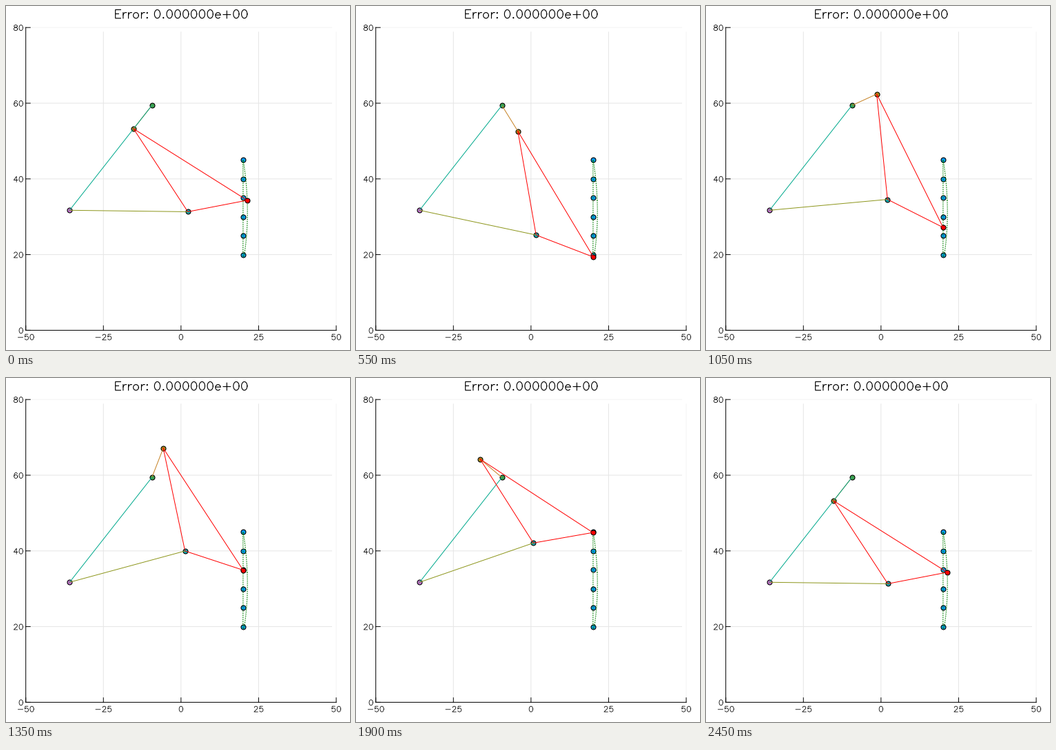
Animation of 499x499 px, one loop 2500 ms. Source, as a matplotlib script:

```python
import numpy as np
import matplotlib.pyplot as plt
from matplotlib.animation import FuncAnimation

SIZE, DPI = 499, 64
PX = 72 / DPI  # one pixel in points
FRAMES, INTERVAL = 50, 50

LEFT, RIGHT, BOTTOM, TOP = 28.7, 479.0, 470.4, 31.2
TICK = 6.5

# Linkage geometry; points are complex numbers in data units
CRANK_PIVOT = -9.378 + 59.41j
ROCKER_PIVOT = -35.9 + 31.71j
CRANK, ROCKER, COUPLER = 8.54, 38.1, 28.04
TRACER = 37.6 + 16.85j  # relative to the coupler bar

fig = plt.figure(figsize=(SIZE / DPI, SIZE / DPI), dpi=DPI, facecolor="white")
ax = fig.add_axes([0, 0, 1, 1])
ax.set_xlim(0, SIZE)
ax.set_ylim(SIZE, 0)
ax.axis("off")


def to_px(z):
    z = np.asarray(z)
    x = LEFT + (z.real + 50) / 100 * (RIGHT - LEFT)
    y = BOTTOM - z.imag / 80 * (BOTTOM - TOP)
    return x, y


def stroke(x, y, color="black", width=1.0, **kw):
    return ax.plot(x, y, color=color, lw=width * PX, snap=False, **kw)[0]


def dots(color):
    return ax.plot([], [], "o", ms=7 * PX, mfc=color, mec="black",
                   mew=1.1 * PX, snap=False)[0]


# ---- single-stroke lettering on a 21 unit cap height ----

def arc(cx, cy, rx, ry, start=0, end=360):
    t = np.radians(np.linspace(start, end, 33))
    return [(cx + rx * np.cos(a), cy + ry * np.sin(a)) for a in t]


DOT = [(5, 2), (4, 1), (5, 0), (6, 1), (5, 2)]
BAR = [(4, 9), (22, 9)]
GLYPHS = {
    " ": (10, []),
    ".": (10, [DOT]),
    ":": (10, [DOT, [(x, y + 12) for x, y in DOT]]),
    "-": (26, [BAR]),
    "+": (26, [BAR, [(13, 18), (13, 0)]]),
    "E": (19, [[(17, 21), (4, 21), (4, 0), (17, 0)], [(4, 11), (12, 11)]]),
    "e": (18, [[(15, 8), (3, 8)], arc(9.2, 7, 6.2, 7, 8, 315)]),
    "o": (19, [arc(9.5, 7, 6.5, 7)]),
    "r": (13, [[(4, 14), (4, 0)], [(4, 8), (5, 11), (7, 13), (9, 14), (12, 14)]]),
    "0": (20, [arc(10, 10.5, 7, 10.5)]),
    "2": (20, [arc(10, 15, 6, 6, 170, -35) + [(3, 0), (17, 0)]]),
    "4": (20, [[(13, 0), (13, 21), (3, 7), (18, 7)]]),
    "5": (20, [[(15, 21), (5, 21), (4, 12)] + arc(10, 7, 7, 7, 150, -150)]),
    "6": (20, [arc(11, 8, 7, 13, 45, 180), arc(10.5, 6.5, 6.5, 6.5)]),
    "8": (20, [arc(10, 16.5, 6, 4.5), arc(10, 6, 7, 6)]),
}


def letter(text, x, y, scale, align, width):
    """Draw text vertically centred on y; align is 0.5 (centre) or 1 (right)."""
    x -= align * scale * sum(GLYPHS[c][0] for c in text)
    for c in text:
        advance, strokes = GLYPHS[c]
        for pts in strokes:
            px, py = np.array(pts).T
            stroke(x + scale * px, y + scale * (10.5 - py), width=width,
                   solid_joinstyle="round")
        x += scale * advance


# ---- static axes ----

def draw_axes():
    grid, edge = "#e6e6e6", "#f4f4f4"
    for v in (-25, 0, 25, 50):
        x = to_px(v)[0]
        stroke([x, x], [TOP + TICK, BOTTOM - TICK], grid if v < 50 else edge)
    for v in (20, 40, 60, 80):
        y = to_px(v * 1j)[1]
        stroke([LEFT + TICK, RIGHT - TICK], [y, y], grid if v < 80 else edge)
    stroke([LEFT, RIGHT], [BOTTOM, BOTTOM])
    stroke([LEFT, LEFT], [BOTTOM, TOP])
    for v in range(-50, 51, 25):
        x = to_px(v)[0]
        stroke([x, x], [BOTTOM, BOTTOM - TICK])
        letter(str(v), x, 480.2, 0.385, 0.5, 0.8)
    for v in range(0, 81, 20):
        y = to_px(v * 1j)[1]
        stroke([LEFT, LEFT + TICK], [y, y])
        letter(str(v), 25.6, y + 0.4, 0.385, 1, 0.8)
    letter("Error: 0.000000e+00", 254, 11.6, 0.59, 0.5, 1.15)


# ---- mechanism ----

def pose(step):
    """Crank end, rocker end and traced point; one turn from first to last step."""
    toward_rocker = np.angle(ROCKER_PIVOT - CRANK_PIVOT)
    turn = 2 * np.pi * np.asarray(step) / (FRAMES - 1)
    crank = CRANK_PIVOT + CRANK * np.exp(1j * (toward_rocker + turn))
    span = crank - ROCKER_PIVOT
    dist = np.abs(span)
    along = (ROCKER**2 - COUPLER**2 + dist**2) / (2 * dist)
    side = np.sqrt(ROCKER**2 - along**2)
    rocker = ROCKER_PIVOT + span / dist * (along - 1j * side)
    tracer = crank + (rocker - crank) / COUPLER * TRACER
    return crank, rocker, tracer


draw_axes()
goals = dots("#0398ee")
goals.set_data(*to_px(20 + 1j * np.arange(20, 46, 5)))
stroke(*to_px(pose(np.arange(FRAMES))[2]), "#008000", 1.2,
       linestyle=(0, (1.25, 1.25)), dash_capstyle="butt")

for pivot, color in ((CRANK_PIVOT, "#3ea44e"), (ROCKER_PIVOT, "#c371d2")):
    dots(color).set_data(*to_px([pivot]))
crank_dot, rocker_dot, tracer_dot = (dots(c) for c in ("#ac8e18", "#00aaae", "#ff0000"))
crank_bar = stroke([], [], "#c68225")
stroke(*to_px([ROCKER_PIVOT, CRANK_PIVOT]), "#00a98d")
rocker_bar = stroke([], [], "#8e971e")
triangle = stroke([], [], "#ff0000")


def update(step):
    crank, rocker, tracer = pose(step)
    parts = (
        (crank_dot, [crank]),
        (rocker_dot, [rocker]),
        (tracer_dot, [tracer]),
        (crank_bar, [CRANK_PIVOT, crank]),
        (rocker_bar, [ROCKER_PIVOT, rocker]),
        (triangle, [crank, rocker, tracer, crank]),
    )
    for artist, points in parts:
        artist.set_data(*to_px(points))
    return [artist for artist, _ in parts]


anim = FuncAnimation(fig, update, frames=FRAMES, interval=INTERVAL,
                     init_func=lambda: update(0), repeat=True, repeat_delay=0)
plt.show()
```
